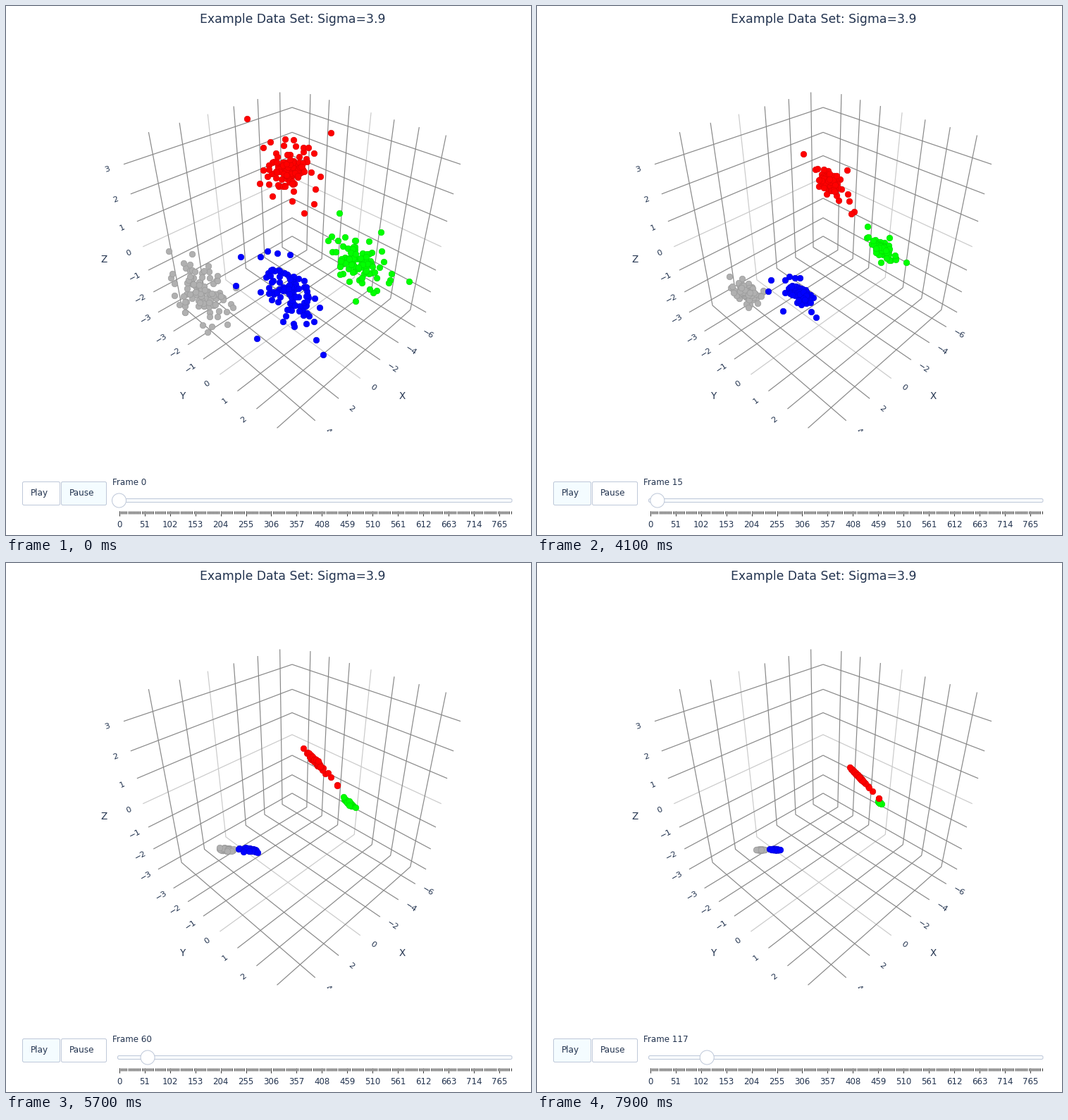
Animation, 745 px wide and 751 px high, one loop 8 s. Source, as a matplotlib script:

```python
import numpy as np
import matplotlib.pyplot as plt
from matplotlib.animation import FuncAnimation
from matplotlib.collections import LineCollection
from matplotlib.colors import to_rgb
from matplotlib.patches import Circle, FancyBboxPatch, Rectangle

W, H, DPI = 745, 751, 100
STEP_MS, FRAMES = 100, 80
PT = 72 / DPI
INK, EDGE, ACTIVE = "#22334f", "#bec8d9", "#f4fcff"

plt.rcParams["font.family"] = "DejaVu Sans"
fig = plt.figure(figsize=(W / DPI, H / DPI), dpi=DPI, facecolor="white")
ax = fig.add_axes([0, 0, 1, 1])
ax.set_xlim(0, W)
ax.set_ylim(H, 0)
ax.axis("off")


def label(x, y, s, px, **kw):
    return ax.text(x, y, s, fontsize=px * PT, color=INK, **kw)


# --- Perspective box, seen along its diagonal; the far corner is the origin.
SIDE, LABEL_AT = 0.332, 0.356


def project(p):
    x, y, z = p
    w = 1 - (x + y + z) / np.sqrt(3)
    return 406 + 458 * (y - x) / w, 334.5 + 264.5 * (x + y - 2 * z) / w


def draw_axis(axis, ticks, first, step, corner, out):
    """Grid lines of one axis: along the first wall, round the corner, out to
    the labelled edge. `corner` and `out` are the other two axes."""
    for k, value in enumerate(ticks):
        base = np.zeros(3)
        base[axis] = first + k * step
        start, end, text = base.copy(), base.copy(), base.copy()
        start[corner], end[out], text[out] = SIDE, SIDE, LABEL_AT
        a, b, c, t = map(project, (start, base, end, text))
        color = "#888888" if value else "#cacaca"
        ax.add_collection(LineCollection([[a, b, c]], colors=color, linewidths=1.2 * PT,
                                         zorder=2 if value else 1))
        if t[1] > 612:
            continue
        slope = -np.degrees(np.arctan((c[1] - b[1]) / (c[0] - b[0])))
        label(*t, str(value).replace("-", "\u2212"), 11.5, rotation=slope,
              ha="center", va="center", zorder=2)


def draw_box():
    X, Y, Z = range(3)
    draw_axis(X, range(-6, 5, 2), 0.0300, 0.0512, corner=Z, out=Y)
    draw_axis(Y, range(-3, 4), 0.0443, 0.0430, corner=Z, out=X)
    draw_axis(Z, range(-3, 4), 0.0143, 0.0473, corner=Y, out=X)
    ax.add_patch(Rectangle((360, 604), 140, 26, fc="white", ec="none", zorder=3))
    for x, y, name in [(139, 360, "Z"), (251, 554, "Y"), (562, 554, "X")]:
        label(x, y, name, 13.5, ha="center", va="center")


# --- Controls
def rounded(x, y, w, h, color):
    return ax.add_patch(FancyBboxPatch((x, y), w, h, fc=color, ec=EDGE, lw=PT,
                                       boxstyle="round,pad=0,rounding_size=2"))


def button(x, width, text):
    label(x + 11.8, 695.3, text, 12)
    return rounded(x, 675.5, width, 33, "white")


def draw_slider():
    rounded(158.5, 699.5, 559.5, 5, "#f8fafc")
    minor = 160.9 + np.arange(264) * 35.92 / 17
    major = minor[::17]
    for xs, bottom in [(minor, 721), (major, 724)]:
        ax.add_collection(LineCollection([[(x, 717), (x, bottom)] for x in xs],
                                         colors="#333333", linewidths=PT))
    for k, x in enumerate(major):
        label(x, 740, str(51 * k), 11.8, ha="center")
    return ax.add_patch(Circle((160.5, 702), 10, fc="white", ec=EDGE, lw=PT, zorder=8))


# --- Clusters: each one shrinks, flattens onto a line and drifts to its mode.
def settle(n, tau=28):
    return np.exp(-(n / tau) ** 0.8)


class Cluster:
    def __init__(self, color, seed, start, goal, tau, angle, spread, corr, far,
                 core=0, tail=0.07, head=0.07):
        self.start, self.goal, self.tau = np.array(start), np.array(goal), tau
        self.core, self.tail, self.head = core, tail, head   # lengths kept in the end
        rng = np.random.default_rng(seed)
        z = rng.normal(size=(100, 2)) * rng.lognormal(0, 0.3, (100, 1))
        z *= np.minimum(1, 2.6 / np.hypot(*z.T))[:, None]
        z[:, 1] = corr * z[:, 0] + np.sqrt(1 - corr ** 2) * z[:, 1]
        rel = np.vstack([z * spread, far - self.start])
        c, s = np.cos(np.radians(angle)), np.sin(np.radians(angle))
        self.rot = np.array([[c, s], [-s, c]])
        self.u, self.v = self.rot @ rel.T
        rim = np.array(to_rgb(color)) * 0.88
        self.dots = ax.scatter([], [], s=(8.5 * PT) ** 2, color=color, edgecolors=[rim],
                               linewidths=0.7 * PT, zorder=5)

    def move(self, n):
        near, far, flat = 1 / np.sqrt(1 + n / 2.5), settle(n), np.exp(-n / 45)

        def shrink(d, keep_near, keep_far):
            a = keep_near + (1 - keep_near) * near
            b = keep_far + (1 - keep_far) * far
            return d * (a + (b - a) * np.minimum(1, (d / 60) ** 2))

        u = shrink(self.u, self.core, np.where(self.u > 0, self.head, self.tail))
        v = shrink(self.v, 0, 0) * flat
        center = self.goal + (self.start - self.goal) * settle(n, self.tau)
        self.dots.set_offsets(np.column_stack([u, v]) @ self.rot + center)


draw_box()
label(406.5, 24.3, "Example Data Set: Sigma=3.9", 17.2, ha="center")
play = button(23.5, 53, "Play")
pause = button(78.5, 64, "Pause")
counter = label(151, 680.3, "", 11.9)
knob = draw_slider()

clusters = [
    Cluster("#b0b0b0", 4, (278, 404), (319, 407), 28, 0, (17, 20), 0.35,
            [(231, 348), (326, 400), (314, 452), (286, 463)]),
    Cluster("#00ff00", 11, (500, 363), (486, 340), 8, 40, (18, 17), 0.35,
            [(473, 294), (532, 321), (572, 391), (496, 419)], core=-0.15, tail=0, head=0),
    Cluster("#0000ff", 7, (406, 411), (336, 406.5), 28, 1, (20, 25), 0.45,
            [(333, 356), (326, 397), (356, 472), (450, 495)]),
    Cluster("#ff0000", 2, (400, 233), (486, 340), 110, 46.5, (18, 17), 0.1,
            [(342, 160), (461, 180), (437, 281), (423, 294)], core=0.38, tail=0.15, head=0.7),
]

# The player runs in bursts: shown iteration against time.
TIMES = [3500, 3600, 4100, 4900, 6600, 7900]
ITER = [0, 3, 15, 39, 81, 117]


def update(i):
    ms = i * STEP_MS
    run = np.interp(ms, TIMES, ITER)
    n = 3 * int(round(run / 3))
    for c in clusters:
        c.move(n)
    counter.set_text(f"Frame {n}")
    knob.center = 160.5 + 0.69 * run, 702
    play.set_facecolor(ACTIVE if ms >= 2200 else "white")
    pause.set_facecolor(ACTIVE if ms < 3500 else "white")
    return [c.dots for c in clusters] + [counter, knob, play, pause]


anim = FuncAnimation(fig, update, frames=FRAMES, interval=STEP_MS, repeat=True, repeat_delay=0)
plt.show()
```
